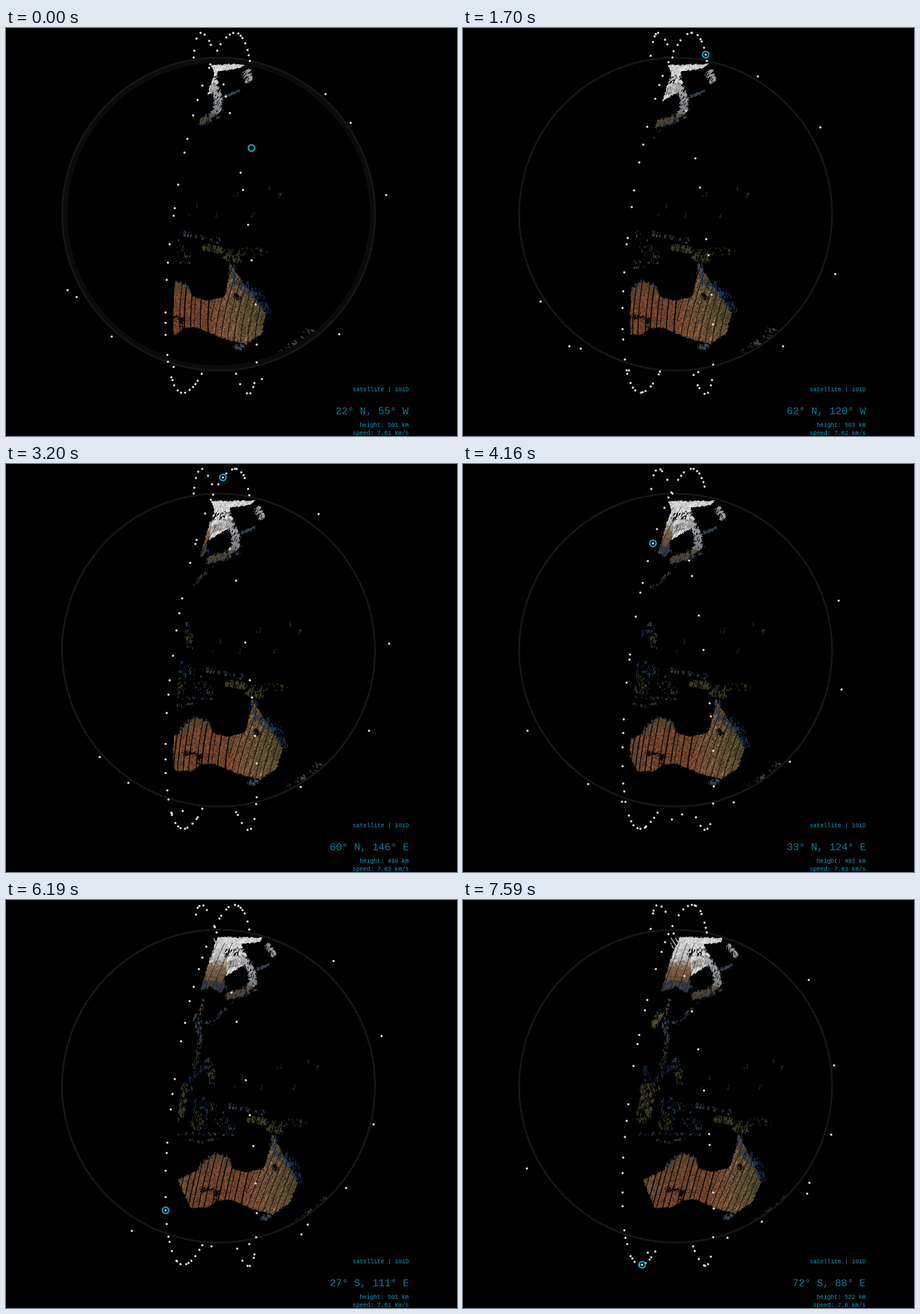
Write a matplotlib script that moves like this. It is 787x712 px and loops after 8 s.

```python
import numpy as np
import matplotlib.pyplot as plt
from matplotlib.animation import FuncAnimation
from matplotlib.patches import Circle
from matplotlib.path import Path

W, H, DPI = 787, 712, 100
CX, CY, RADIUS = 371, 324.5, 273
DIST = 4.0                                   # camera distance in globe radii
FOCAL = RADIUS * np.sqrt(DIST ** 2 - 1)
ORBIT = 1.152
SPIN = 0.07                                  # earth turn per orbital degree
STEP, LOOP = 40, 8000
TEAL = "#139db8"
rng = np.random.default_rng(11)

# Moments (ms) at which the picture jumps on
STARTS = np.array([0, 590, 1070, 1700, 2150, 2600, 3200, 3680, 4160, 4630,
                   5110, 5710, 6190, 6670, 7110, 7590])

# Key points of the pass: time, orbital angle, latitude, longitude, height
KEYS = np.array([
    (0, -60, 22, -55, 501), (1070, -30, 51, -63, 503), (2600, 16, 77, -201, 503),
    (4160, 64, 33, -236, 493), (5110, 94, 3, -242, 492),
    (6190, 125, -27, -249, 501), (7590, 168, -72, -272, 522)]).T


def track(t):
    return [np.interp(t, KEYS[0], row) for row in KEYS[1:]]


# ---- satellites --------------------------------------------------------------
DOWN = (0.147, 0.989, 0), (-0.182, 0.027, 0.983)
UP = (-0.131, 0.991, 0), (0.111, 0.015, 0.994)


def spread(gap):
    """Orbital slots at a mean gap, irregular; the first one stays at zero."""
    slots = np.arange(0, 360, gap)
    return slots + rng.uniform(-0.45, 0.45, slots.size) * gap * (slots > 0)


fleet_down, fleet_up = spread(5.3), spread(9.2)
stray_angle = rng.uniform(0, 220, 9)
stray_radius = rng.uniform(277, 308, 9)


def orbit(plane, deg):
    """Screen position and visibility of points on an orbital plane."""
    a, b = (np.array(v)[:, None] for v in plane)
    rad = np.radians(np.atleast_1d(deg))
    x, y, z = ORBIT * (a * np.cos(rad) + b * np.sin(rad))
    scale = FOCAL / (DIST - z)
    x, y = x * scale, -y * scale
    seen = (z > 1 / DIST) | (np.hypot(x, y) > RADIUS)
    return x + CX, y + CY, seen


def dots(phi):
    found = []
    for plane, deg in ((DOWN, fleet_down + phi), (UP, fleet_up - phi)):
        x, y, seen = orbit(plane, deg)
        found.append((x[seen], y[seen]))
    # a few others circle just outside the limb, from lower left to upper right
    rad = np.radians(155 - (stray_angle + 0.5 * phi) % 220)
    found.append((CX + stray_radius * np.cos(rad), CY + stray_radius * np.sin(rad)))
    return np.concatenate(found, axis=1)


# ---- land texture, laid out as seen at the end of the pass -------------------
X0, X1, Y0, Y1, FINE = 280, 640, 50, 600, 2
gy, gx = np.mgrid[Y0:Y1:1 / FINE, X0:X1:1 / FINE]
tex = np.zeros(gx.shape + (3,))
NOISE = rng.random((257, 257))

ORANGE, TAN, OLIVE = (126, 76, 48), (116, 88, 60), (62, 62, 38)
BLUE, SLATE, BLACK = (30, 48, 82), (58, 70, 84), (0, 0, 0)


def noise(x, y, w, h=None, seed=0):
    i = np.floor(x / w).astype(int) + 31 * seed
    j = np.floor(y / (h or w)).astype(int) + 57 * seed
    return NOISE[j % 257, i % 257]


def ramp(v, *stops):
    """Blend colours along v; stops are (value, colour)."""
    at, colours = zip(*stops)
    return np.stack([np.interp(v, at, c) for c in zip(*colours)], axis=-1)


def land(pts, colour, width=0, density=1.0, rough=3):
    """Ragged polygon, or a ragged stroke along pts when a width is given."""
    pts = np.array(pts, float)
    pad = rough + width / 2
    (xa, ya), (xb, yb) = pts.min(0) - pad, pts.max(0) + pad
    j, i = np.nonzero((gx > xa) & (gx < xb) & (gy > ya) & (gy < yb))
    x, y = gx[j, i], gy[j, i]
    wx = x + rough * (0.6 * noise(x, y, 1.5, seed=1) + 0.6 * noise(x, y, 4, seed=2) - 0.6)
    wy = y + rough * (0.6 * noise(x, y, 1.5, seed=7) + 0.6 * noise(x, y, 4, seed=8) - 0.6)
    if width:
        s = np.linspace(0, len(pts) - 1, 12 * len(pts))
        line = [np.interp(s, range(len(pts)), c) for c in pts.T]
        gap = np.min([np.hypot(wx - a, wy - b) for a, b in zip(*line)], axis=0)
        keep = gap < width / 2
    else:
        keep = Path(pts).contains_points(np.column_stack([wx, wy]))
    if density < 1:
        fine = noise(x + 0.27 * y, y, 1.1, 4, seed=3)
        patch = noise(x, y, 5, 6, seed=9)
        keep &= 0.6 * fine + 0.4 * patch < 0.15 + 0.7 * density
    j, i, x, y = j[keep], i[keep], x[keep], y[keep]
    shade = 0.72 + 0.28 * noise(x, y, 1, seed=4) + 0.16 * noise(x, y, 4, seed=5)
    tone = colour(x, y) if callable(colour) else np.array(colour)
    tex[j, i] = shade[:, None] * tone


def outback(x, y):
    v = x + 24 * noise(x, y, 3, seed=10) - 12
    tone = ramp(v, (320, TAN), (352, ORANGE), (425, ORANGE), (470, TAN), (520, (80, 74, 46)))
    return tone * np.where(noise(x, y, 1.5, seed=11) < 0.2, 0.6, 1)[:, None]


def tundra(x, y):
    v = y + 14 * noise(x, y, 2.5, seed=10) - 7 - 60 * (x > 397)
    return ramp(v, (60, (222,) * 3), (100, (205,) * 3), (114, (136, 112, 88)),
                (134, (112, 84, 58)), (154, (52, 58, 68)))


def shore(x, y):
    return ramp(y + 8 * noise(x, y, 2, seed=10),
                (115, (168, 172, 176)), (148, (140, 142, 144)), (160, (78, 70, 58)))


def paint_australia():
    land([(314, 488), (335, 478), (352, 469), (366, 454), (383, 441), (403, 449),
          (410, 467), (434, 475), (465, 465), (474, 437), (481, 408), (492, 432),
          (512, 470), (520, 492), (503, 528), (474, 547), (440, 537), (408, 522),
          (385, 523), (362, 536), (335, 537), (322, 510)], outback)
    land([(362, 464), (384, 450), (400, 458)], (88, 72, 46), 18, 0.55, 6)

    ground = tex.sum(2) > 0
    west = ground & (gx + 0.3 * (gy - 490) < 438)
    east = ground & ~west
    lean = gx + 0.27 * (gy - 490)
    at = 322
    while at < 440:
        tex[west & (np.abs(lean - at) < rng.uniform(0.4, 1.3))] *= 0.08
        at += rng.uniform(6, 14)
    lean = gx + 0.42 * (gy - 490)
    tex[east & (lean % 10 < 1.2)] *= 0.25
    tex[east & (lean % 7 < 1.2)] *= 1.25
    tex[east & ((gx + 0.85 * (gy - 490)) % 14 < 1.2)] *= 1.3

    land([(358, 506), (370, 506), (384, 508), (378, 518), (386, 526)], BLACK, 6, 1, 9)
    land([(483, 463), (484, 468)], BLACK, 7, 1, 5)
    land([(482, 414), (485, 442)], BLUE, 11, 0.5)
    land([(496, 446), (511, 458), (519, 482)], BLUE, 18, 0.45, 6)
    land([(352, 468), (383, 442), (404, 450)], SLATE, 7, 0.3)
    land([(456, 553), (468, 551)], SLATE, 9, 0.6)
    land([(510, 557), (540, 537), (560, 517)], (72, 72, 66), 5, 0.3)


def paint_islands():
    land([(443, 382), (466, 385)], OLIVE, 13, 0.65)
    land([(476, 399), (494, 402)], OLIVE, 13, 0.5)
    land([(470, 388), (530, 388)], OLIVE, 13, 0.14)
    land([(404, 357), (464, 369)], SLATE, 10, 0.24)
    land([(376, 365), (404, 392)], SLATE, 26, 0.13)
    land([(304, 407), (412, 408)], SLATE, 6, 0.25)
    land([(338, 418), (362, 423), (386, 415)], SLATE, 5, 0.35)
    land([(320, 350), (314, 376)], OLIVE, 25, 0.5)
    land([(357, 356), (355, 388)], BLUE, 28, 0.22)
    land([(353, 376), (350, 390)], OLIVE, 22, 0.3)
    land([(318, 330), (332, 329)], OLIVE, 21, 0.48)
    land([(318, 293), (320, 310)], BLUE, 11, 0.3)
    land([(332, 318), (364, 288)], BLUE, 9, 0.25)
    land([(370, 283), (378, 314)], SLATE, 15, 0.35)
    land([(376, 300), (380, 314)], OLIVE, 11, 0.4)
    land([(355, 234), (353, 262), (346, 290)], (52, 60, 62), 9, 0.4)
    for x, y in rng.uniform((410, 265), (570, 325), (8, 2)):
        land([(x + 1, y), (x - 1, y + 6)], (46, 52, 50), 3, 0.5)


def paint_north():
    land([(345, 196), (332, 218)], (80, 76, 52), 12, 0.55)
    land([(352, 208), (352, 226)], SLATE, 10, 0.45)
    land([(360, 174), (354, 198)], (100, 88, 64), 4, 0.6)
    land([(357, 211), (376, 213), (398, 190)], SLATE, 6, 0.45)
    land([(402, 171), (407, 177)], BLUE, 9, 0.4)
    for x in (356, 363, 370):
        land([(x, 66), (x + 11, 84)], (190,) * 3, 1.8, 1, 1)
    land([(378, 63), (452, 66), (449, 73), (418, 77), (430, 96), (428, 112),
          (408, 125), (394, 134), (396, 152), (388, 162), (372, 150),
          (344, 160), (357, 118), (366, 90)], tundra)
    land([(404, 112), (424, 104)], (150, 148, 146), 14, 0.7, 5)
    land([(396, 92), (420, 90)], BLACK, 14, 0.45, 5)
    land([(354, 143), (376, 143), (398, 154)], BLUE, 9, 0.35, 5)
    land([(430, 108), (440, 124), (446, 144), (430, 158), (403, 167)], shore, 12, 0.9, 5)
    land([(446, 122), (467, 114)], SLATE, 6, 0.7)
    land([(452, 154), (430, 166), (404, 174)], SLATE, 5, 0.4)
    land([(463, 80), (475, 95)], (160,) * 3, 9, 0.75, 4)
    lean = gx + 0.36 * (gy - 110)
    tex[(gy < 165) & (gy > 74) & (gx < 405) & (lean % 13 < 1)] *= 0.35


paint_australia()
paint_islands()
paint_north()
tex = (tex + np.roll(tex, 1, 0) + np.roll(tex, 1, 1) + np.roll(tex, (1, 1), (0, 1))) / 4
tex = np.clip(tex, 0, 255).astype(np.uint8)


# ---- globe -------------------------------------------------------------------
py, px = np.mgrid[0:H, 0:W]
rx, ry = (px - CX) / FOCAL, (py - CY) / FOCAL
k = rx ** 2 + ry ** 2
disc = (k * DIST) ** 2 - (1 + k) * (k * DIST ** 2 - 1)
sz = (k * DIST + np.sqrt(np.maximum(disc, 0))) / (1 + k)
sx, sy = rx * (DIST - sz), ry * (DIST - sz)

# Land shows only east of the ground track
tx, ty, _ = orbit(DOWN, np.arange(20, 166))
edge = np.minimum(np.interp(py, ty, tx) + 13, 355 + 0.4 * (py - 62))
shown = (disc > 0) & (px > edge + 2 * noise(px, py, 2, 4, seed=6))


def globe(phi):
    turn = np.radians(SPIN * (KEYS[1, -1] - phi))
    x = sx * np.cos(turn) + sz * np.sin(turn)
    z = sz * np.cos(turn) - sx * np.sin(turn)
    scale = FOCAL / (DIST - z)
    i = ((x * scale + CX - X0) * FINE).astype(int)
    j = ((sy * scale + CY - Y0) * FINE).astype(int)
    ok = shown & (i >= 0) & (j >= 0) & (i < tex.shape[1]) & (j < tex.shape[0])
    img = np.zeros((H, W, 3), np.uint8)
    img[ok] = tex[j[ok], i[ok]]
    return img


# ---- stage -------------------------------------------------------------------
def pt(pixels):
    return pixels * 72 / DPI


fig = plt.figure(figsize=(W / DPI, H / DPI), dpi=DPI, facecolor="black")
views = [globe(track(t)[0]) for t in STARTS]
picture = fig.figimage(views[0], origin="upper")
ax = fig.add_axes([0, 0, 1, 1], zorder=1)
ax.set_xlim(0, W)
ax.set_ylim(H, 0)
ax.axis("off")

halo = ax.add_patch(Circle((CX, CY + 0.3), 268.5, fill=False, lw=pt(9), ec="#0b0b0b"))
ax.add_patch(Circle((CX, CY + 0.3), RADIUS, fill=False, lw=pt(3), ec="#181818"))
fleet, = ax.plot([], [], "o", ms=pt(3.9), mew=0, color="#d9d9d9")
marker, = ax.plot([], [], "o", ms=pt(11), mew=pt(2.6), mfc="none", mec=TEAL)


def label(y, size, text="", **kw):
    return ax.text(702.8, y, text, size=pt(size), color=TEAL, ha="right",
                   va="baseline", family="Liberation Mono", **kw)


label(634.5, 10.3, "satellite | 101D")
lines = [label(674, 17.8, alpha=0.8), label(696.5, 10.3), label(709.5, 10.3)]


def readout(phi, lat, lon, height):
    lat, lon = round(lat), (round(lon) + 180) % 360 - 180
    speed = 7.6108 + 0.0155 * np.cos(np.radians(phi - 42))
    return (f"{abs(lat)}° {'NS'[lat < 0]}, {abs(lon)}° {'EW'[lon < 0]}",
            f"height: {height:.0f} km", f"speed: {round(speed, 2):g} km/s")


def draw(i):
    n = np.searchsorted(STARTS // STEP, i, side="right") - 1
    state = track(STARTS[n])
    picture.set_data(views[n])
    halo.set_visible(bool(n == 0))
    fleet.set_data(*dots(state[0]))
    x, y, _ = orbit(DOWN, state[0])
    marker.set_data(x, y)
    for line, text in zip(lines, readout(*state)):
        line.set_text(text)
    return picture, halo, fleet, marker, *lines


anim = FuncAnimation(fig, draw, frames=LOOP // STEP, interval=STEP, repeat=True)
plt.show()
```
